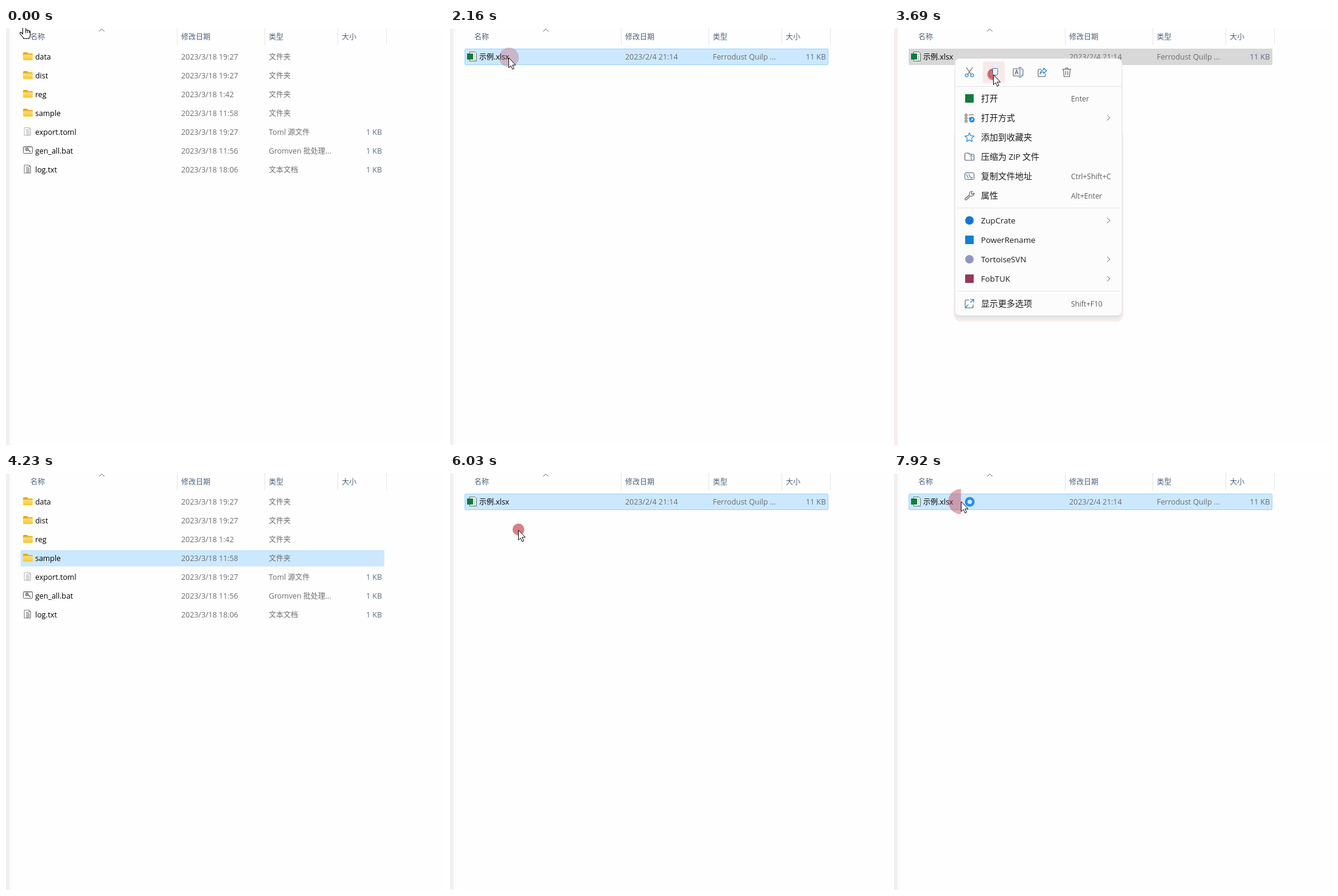
An HTML page with a canvas for the animation above (8000 ms loop, 720x687 px).

```html
<!DOCTYPE html>
<html lang="zh">
<head>
<meta charset="utf-8">
<style>
  html, body { margin: 0; width: 100%; height: 100%; overflow: hidden; background: #fff; }
  canvas { display: block; }
</style>
</head>
<body>
<canvas id="stage" width="720" height="687"></canvas>
<script>
const ctx = document.getElementById('stage').getContext('2d');
const LOOP = 8000, STEP = 90;
const FAMILY = '"Open Sans", "Noto Sans CJK SC", "Noto Sans CJK", sans-serif';
const BLUE = '#1683d8', INK = '#5c5c5c', GREEN = '#107c41';

// Han and Latin runs have slightly different optical sizes.
const LIST = { han: 12, latin: 12.4 };
const MENU = { han: 14, latin: 13.2 };
const KEYS = { han: 12, latin: 11.9 };

const folder = (name, date) => ({ name, date, type: '文件夹', icon: drawFolder });
const HOME = [
  folder('data', '2023/3/18 19:27'),
  folder('dist', '2023/3/18 19:27'),
  folder('reg', '2023/3/18 1:42'),
  folder('sample', '2023/3/18 11:58'),
  { name: 'export.toml', date: '2023/3/18 19:27', type: 'Toml 源文件', size: '1 KB', icon: y => drawPage(y, '#b4b4b4') },
  { name: 'gen_all.bat', date: '2023/3/18 11:56', type: 'Gromven 批处理...', size: '1 KB', icon: drawBatch },
  { name: 'log.txt', date: '2023/3/18 18:06', type: '文本文档', size: '1 KB', icon: y => drawPage(y, '#777') }
];
const SHEET = [{ name: '示例.xlsx', date: '2023/2/4 21:14', type: 'Ferrodust Quilp ...', size: '11 KB', icon: drawSheet }];

// Each scene lasts until the next one starts.
const SCENES = [
  { at: 0, rows: HOME },
  { at: 1170, rows: HOME, selected: 3, strip: '#e5e5e5' },
  { at: 1440, rows: [], note: '正在处理它...' },
  { at: 1530, rows: SHEET },
  { at: 1980, rows: SHEET, selected: 0 },
  { at: 2700, rows: SHEET, selected: 0, menu: true },
  { at: 3510, rows: SHEET, selected: 0, menu: true, strip: '#faecec' },
  { at: 3870, rows: SHEET, selected: 0, focus: true },
  { at: 4050, rows: [], note: '正在处理它...' },
  { at: 4140, rows: HOME, selected: 3 },
  { at: 4950, rows: HOME, selected: 3, strip: '#e5e5e5' },
  { at: 5220, rows: [], note: '此文件夹为空。' },
  { at: 6030, rows: SHEET, selected: 0, focus: true },
  { at: 6750, rows: SHEET },
  { at: 7560, rows: SHEET, selected: 0 }
];

const PATH = [
  [0, 30, -4], [90, 36, 24], [450, 108, 361], [540, 106, 350], [810, 91, 152], [900, 90, 144],
  [1440, 90, 144], [1890, 96, 49], [2700, 96, 49], [3420, 163, 77], [3780, 163, 77],
  [4050, 70, -25], [4230, 60, -25], [4320, 68, 1], [4590, 113, 126], [4770, 109, 46],
  [5310, 109, 46], [5670, 112, 94], [7290, 112, 94], [7560, 110, 47], [LOOP, 110, 47]
];

const CLICKS = [
  { at: 1170, x: 91, y: 145, half: true, fade: .001 },
  { at: 1980, x: 97, y: 48.5, fade: .002 },
  { at: 2520, x: 96.5, y: 48.5, hold: 180, fade: .002 },
  { at: 3690, x: 163, y: 76.5, half: true, fade: .001 },
  { at: 4950, x: 109, y: 47, half: true, fade: .001 },
  { at: 5670, x: 113, y: 93.5, life: 180, fade: .002 },
  { at: 6030, x: 112.5, y: 93, hold: 720, fade: .0016 },
  { at: 7610, x: 110, y: 47, half: true, life: 400, fade: .0007 }
];

function text(str, x, y, style, color, right) {
  const runs = str.match(/[\u3000-\u9fff]+|[^\u3000-\u9fff]+/g);
  const setFont = run => {
    ctx.font = `${/[\u3000-\u9fff]/.test(run) ? style.han : style.latin}px ${FAMILY}`;
    return ctx.measureText(run).width;
  };
  if (right) x -= runs.reduce((sum, run) => sum + setFont(run), 0);
  ctx.fillStyle = color;
  for (const run of runs) {
    const width = setFont(run);
    ctx.fillText(run, x, y);
    x += width;
  }
}

function rect(x, y, w, h, color) {
  ctx.fillStyle = color;
  ctx.fillRect(x, y, w, h);
}

function rounded(x, y, w, h, r, fill, stroke) {
  ctx.beginPath();
  ctx.roundRect(x, y, w, h, r);
  if (fill) { ctx.fillStyle = fill; ctx.fill(); }
  if (stroke) { ctx.strokeStyle = stroke; ctx.lineWidth = 1; ctx.stroke(); }
}

function disc(x, y, r, color) {
  ctx.beginPath();
  ctx.arc(x, y, r, 0, Math.PI * 2);
  ctx.fillStyle = color;
  ctx.fill();
}

// Paths are drawn around their own origin.
function shape(x, y, d, stroke, fill, width = 1.1) {
  const path = new Path2D(d);
  ctx.save();
  ctx.translate(x, y);
  ctx.lineJoin = ctx.lineCap = 'round';
  ctx.lineWidth = width;
  if (fill) { ctx.fillStyle = fill; ctx.fill(path); }
  if (stroke) { ctx.strokeStyle = stroke; ctx.stroke(path); }
  ctx.restore();
}

function drawFolder(y) {
  rounded(28, y - 7, 8, 6, 1.5, '#e9a50c');
  rounded(28, y - 5, 16, 10, 1.5, '#eeb11c');
  const shade = ctx.createLinearGradient(0, y - 3, 0, y + 6);
  shade.addColorStop(0, '#ffdf7d');
  shade.addColorStop(1, '#fbc62e');
  rounded(28, y - 3, 16, 9, 1.5, shade);
}

function drawPage(y, color) {
  shape(35.5, y - .5, 'M-5-6.5H2.5L5-4V6.5H-5ZM2.5-6.5V-4H5', color, '#fcfcfc', 1);
  for (let i = 0; i < 5; i++) rect(33, y - 4 + i * 2, i ? 6 : 4, 1, color);
}

function drawBatch(y) {
  rounded(28.5, y - 6.5, 15, 11, 1, '#f8f8f8', '#666');
  rect(29, y - 6, 14, 1, '#bbb');
  shape(34.5, y - 2, 'M-2 0A2 2 0 1 0 2 0A2 2 0 1 0-2 0M2 1L5.5 4', '#666', '#ddd', 1.4);
}

function drawSheet(y) {
  shape(38, y, 'M-5.5-7.5H3L5.5-5V7.5H-5.5Z', '#56705f', '#fff', 1);
  for (let i = 0; i < 4; i++) rect(39, y - 4 + i * 3, 3, 1, '#8aa898');
  rect(28, y - 5, 10, 10, GREEN);
}

function drawHeader() {
  [['名称', 40], ['修改日期', 288], ['类型', 432], ['大小', 552]]
    .forEach(([label, x]) => text(label, x, 19, LIST, '#4c607a'));
  for (const x of [281, 425, 545, 625]) rect(x, 0, 1, 28, '#e5e5e5');
  shape(157.5, 3.5, 'M-4 2L0-2L4 2', '#666', null, 1);
}

function drawRow(row, i, scene, hover) {
  const y = 34 + i * 31;
  const selected = scene.selected === i;
  if (selected && scene.menu) rounded(24, y, 598, 27, 1, '#d8d8d8');
  else if (selected && (hover || scene.focus)) rounded(24.5, y + .5, 597, 26, 1, '#cce8ff', '#99d1ff');
  else if (selected) rounded(24, y, 598, 27, 1, '#cce8ff');
  else if (hover) rounded(24, y, 598, 27, 1, '#d8edff');
  row.icon(y + 13);
  text(row.name, 48, y + 18, LIST, '#000');
  text(row.date, 288, y + 18, LIST, '#6d6d6d');
  text(row.type, 432, y + 18, LIST, '#6d6d6d');
  if (row.size) text(row.size, 618, y + 18, LIST, '#5f6b80', true);
}

const TOOLS = [
  (x, y) => {
    shape(x, y, 'M-5-8L3 4M5-8L-3 4', INK);
    shape(x, y, 'M-7 5A2.4 2.4 0 1 0-2 5A2.4 2.4 0 1 0-7 5M2 5A2.4 2.4 0 1 0 7 5A2.4 2.4 0 1 0 2 5', BLUE);
  },
  (x, y) => {
    rounded(x - 7, y - 4, 9, 11, 2, null, INK);
    rounded(x - 2.5, y - 6.5, 9, 11, 2, '#fdf4f4', BLUE);
  },
  (x, y) => {
    shape(x, y, 'M1-6H-6Q-8-6-8-4V4Q-8 6-6 6H1M5-6Q8-6 8-4V4Q8 6 5 6M-5 3L-2.5-4L0 3M-4 1H-1', INK);
    shape(x, y, 'M3-8V8M1-8H5M1 8H5', BLUE);
  },
  (x, y) => {
    shape(x, y, 'M-2-5H-5Q-7-5-7-3V5Q-7 7-5 7H3Q5 7 5 5V3', INK);
    shape(x, y, 'M2-7L7-3L2 2V-1Q-2-1-4 3Q-3-4 2-4Z', BLUE);
  },
  (x, y) => shape(x, y, 'M-7-5H7M-2-5V-7H2V-5M-5.5-5L-4.5 7H4.5L5.5-5M-1.7-2V4M1.7-2V4', INK)
];

const square = color => (x, y) => rect(x - 7, y - 7, 14, 14, color);
const circle = color => (x, y) => disc(x, y, 7, color);

const ITEMS = [
  { y: 116, label: '打开', keys: 'Enter', icon: square(GREEN) },
  { y: 148, label: '打开方式', more: true, icon: (x, y) => {
    shape(x, y, 'M-7-6H-4V-3H-7ZM-7-1H-4V2H-7ZM-7 4H-4V7H-7ZM-1-5H7M-1 0H1', INK);
    disc(x + 4, y + 3, 4.5, BLUE);
    shape(x + 4, y + 3, 'M-1.5 1.5L1.5-1.5M-.5-1.5H1.5V.5', '#fff');
  } },
  { y: 180, label: '添加到收藏夹', icon: (x, y) =>
    shape(x, y, 'M0-7.5L2.2-2.6L7.5-2L3.6 1.7L4.6 7L0 4.4L-4.6 7L-3.6 1.7L-7.5-2L-2.2-2.6Z', BLUE) },
  { y: 212, label: '压缩为 ZIP 文件', icon: (x, y) => {
    shape(x, y, 'M-7.5-4Q-7.5-6-6-6H-2L0-4H6Q7.5-4 7.5-2V4Q7.5 6 6 6H-6Q-7.5 6-7.5 4Z', INK);
    shape(x, y, 'M3-4V-1M3 1V5M1-1H5', BLUE);
  } },
  { y: 244, label: '复制文件地址', keys: 'Ctrl+Shift+C', icon: (x, y) => {
    rounded(x - 7.5, y - 5.5, 15, 11, 2, null, INK);
    shape(x, y, 'M-5-3L-2 3M-1-3L2 3', BLUE);
    rect(x + 3, y + 2, 2, 1.5, INK);
  } },
  { y: 276, label: '属性', keys: 'Alt+Enter', icon: (x, y) =>
    shape(x, y, 'M-7 5L0-1Q-1-7 5-7L3-4L5-2L8-4Q7 2 1 1L-5 7Q-8 8-7 5Z', INK) },
  { y: 317, label: 'ZupCrate', more: true, icon: circle('#0f78d4') },
  { y: 349, label: 'PowerRename', icon: square('#1280d0') },
  { y: 381, label: 'TortoiseSVN', more: true, icon: circle('#9296bd') },
  { y: 413, label: 'FobTUK', more: true, icon: square('#94385a') },
  { y: 454, label: '显示更多选项', keys: 'Shift+F10', icon: (x, y) => {
    shape(x, y, 'M-1-6H-5Q-7-6-7-4V5Q-7 7-5 7H4Q6 7 6 5V2', INK);
    shape(x, y, 'M2-7H7V-2M7-7L2-2M-7 7L-2 2', BLUE);
  } }
];

function drawMenu(age, cursor, tinted) {
  const open = 1 - Math.pow(1 - Math.min(1, (age + STEP) / 270), 3);
  ctx.save();
  ctx.beginPath();
  ctx.rect(90, 40, 300, 10 + 436 * open);
  ctx.clip();
  rounded(98, 165, 279, 319, 12, tinted ? '#faecec' : '#f4f4f4');
  rounded(99, 60, 277, 420, 10, '#eeeaea');
  rounded(100, 60, 275, 417, 9, '#e2e2e2');
  rounded(100.5, 50.5, 274, 423, 7, '#fcfcfc', '#ebebeb');
  ctx.beginPath();
  ctx.rect(100, 50, 275, 424 * open);
  ctx.clip();
  TOOLS.forEach((icon, i) => {
    const x = 124 + i * 40;
    if (Math.abs(cursor.x - x) < 18 && cursor.y > 55 && cursor.y < 91)
      rounded(x - 18, 55, 36, 36, 4, tinted ? '#f8e9e9' : '#f0f0f0');
    icon(x, 73);
  });
  rect(101, 96, 273, 1, '#e5e5e5');
  rect(104, 296, 267, 1, '#e5e5e5');
  rect(104, 433, 267, 1, '#e5e5e5');
  for (const item of ITEMS) {
    item.icon(124, item.y);
    text(item.label, 143, item.y + 5, MENU, '#1b1b1b');
    if (item.keys) text(item.keys, 291, item.y + 5, KEYS, '#5c5c5c');
    if (item.more) shape(353, item.y, 'M-2.5-4L2 0L-2.5 4', '#666', null, 1);
  }
  ctx.restore();
}

function drawClick(click, t) {
  const { at, x, y, half, hold = 0, life = 360, fade } = click;
  const age = t - at;
  if (age < 0 || age >= hold + life) return;
  const growth = Math.max(0, age - hold);
  ctx.beginPath();
  ctx.arc(x, y, 9.7 + growth * .036, Math.PI / 2, Math.PI * (half ? 1.5 : 2.5));
  ctx.fillStyle = `rgba(190, 60, 72, ${Math.max(0, .65 - growth * fade)})`;
  ctx.fill();
}

function drawCursor({ x, y }, hand) {
  if (hand) {
    shape(x, y, 'M-2.5 1Q0-2 2.5 1V8Q4 6.5 5.5 8Q7.5 7 8.5 9Q10 8.5 10 11V15Q10 18 8 20V21.5H-1.5V20L-6.5 14Q-8 11-5.5 11L-2.5 14ZM2.5 8V12M5.5 8V12M8.5 9V12', '#111', '#fff', 1.1);
  } else {
    shape(x + .5, y + .5, 'M0 0V16L3.6 12.6L6.2 18.5L8.8 17.3L6.2 11.5H11Z', '#111', '#fff', 1);
  }
}

function cursorAt(t) {
  const next = PATH.findIndex(point => point[0] > t);
  const [t0, x0, y0] = PATH[next - 1], [t1, x1, y1] = PATH[next];
  const k = (t - t0) / (t1 - t0), ease = k * k * (3 - 2 * k);
  return { x: Math.round(x0 + (x1 - x0) * ease), y: Math.round(y0 + (y1 - y0) * ease) };
}

function render(time) {
  const t = Math.floor(time % LOOP / STEP) * STEP;
  const scene = SCENES.filter(s => s.at <= t).pop();
  const cursor = cursorAt(t);
  const hovered = scene.menu || cursor.x < 24 || cursor.x > 622 ? -1 : Math.floor((cursor.y - 34) / 31);

  rect(0, 0, 720, 687, '#fefefe');
  rect(0, 1, 6, 686, scene.strip || '#f0f0f0');
  if (!scene.strip) rect(8, 1, 1, 686, '#f6f6f6');
  drawHeader();
  scene.rows.forEach((row, i) => drawRow(row, i, scene, i === hovered));
  if (scene.note) text(scene.note, scene.note.endsWith('。') ? 593 : 600, 52, LIST, '#6d6d6d');
  if (scene.menu) drawMenu(t - 2700, cursor, scene.strip);
  CLICKS.forEach(click => drawClick(click, t));
  if (t >= 7830) {
    disc(124.5, 47.5, 8, '#2a8fe8');
    disc(124.5, 47.5, 3.6, '#d3eafd');
  }
  drawCursor(cursor, t === 0);
}

function loop() {
  render(performance.now());
  requestAnimationFrame(loop);
}
loop();
</script>
</body>
</html>
```
